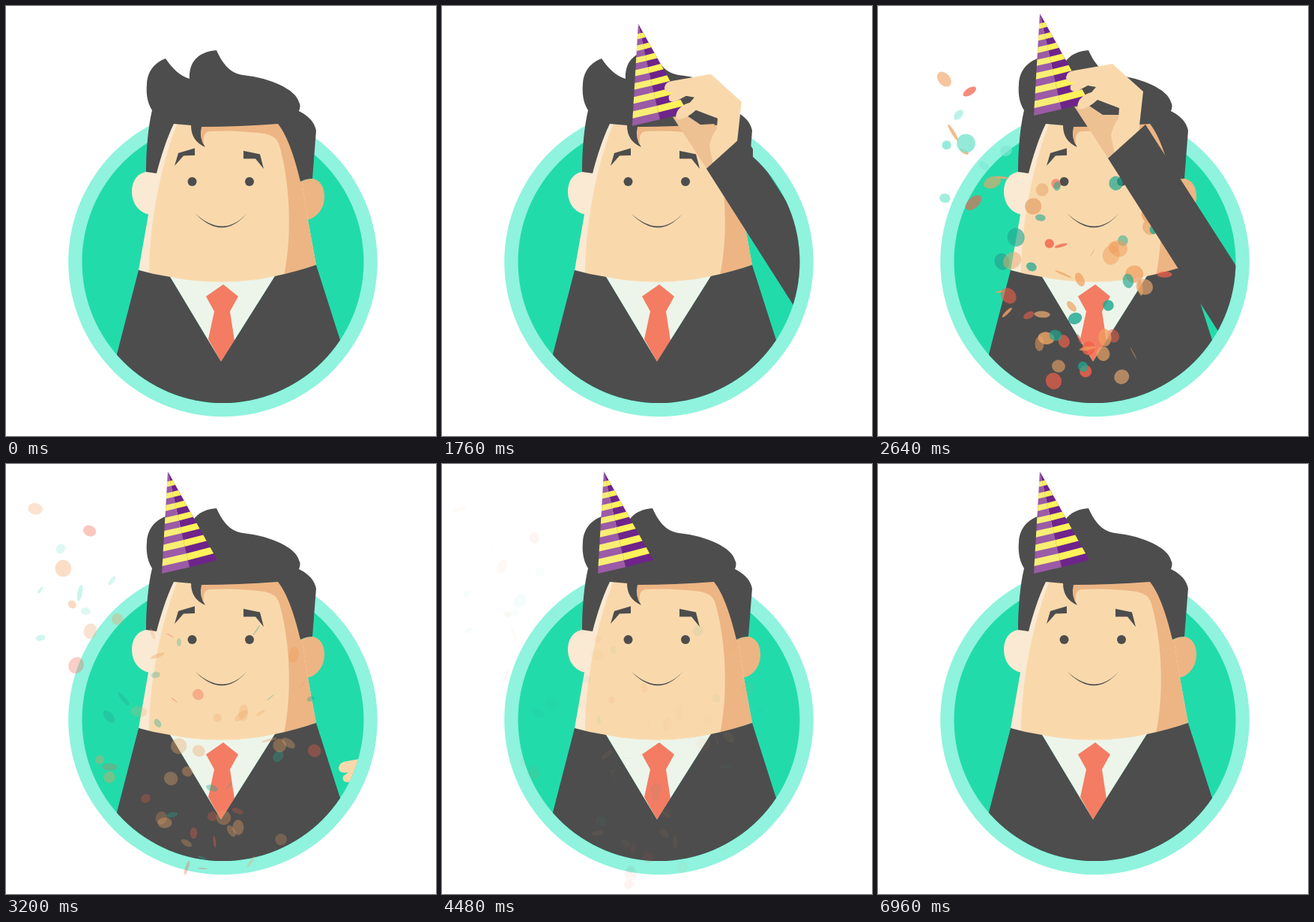
An HTML page with a canvas for the animation above (7.04 s loop, 574 by 573 pixels).

```html
<!DOCTYPE html>
<html lang="en">
<head>
<meta charset="utf-8">
<title>Party hat</title>
<style>
  html, body { margin: 0; width: 100%; height: 100%; overflow: hidden; background: #fff; }
  canvas { display: block; width: 574px; height: 573px; }
</style>
</head>
<body>
<canvas id="stage" width="574" height="573"></canvas>
<script>
const ctx = document.getElementById('stage').getContext('2d');
const LOOP = 7040, STEP = 80;
const ENTER = 800, SETTLE = 2160, POP = 2200, RELEASE = 2640, GONE = 5800;
const CX = 289.5, CY = 341, R = 188;
const DARK = '#4d4d4d', SKIN = '#f9d9ac', SHADE = '#edb583', PALE = '#fae9d3';

const shapes = {
  leftEar: 'M203 223C181 215 168 229 168 247C168 264 178 275 191 278Z',
  rightEar: 'M391 236Q399 230 409 230C420 232 425 242 425 254C425 270 415 282 402 285Z',
  head: 'M177 352L190 278L199 222L210 150H390L395 234L403 285L414 345Q290 389 177 352Z',
  face: 'M191 357C191 295 205 215 229 156H363L385 230L385 355Q290 379 191 357Z',
  shade: 'M260 158L363 150H390L395 234L403 285L414 345Q394 352 371 359C382 310 380 235 364 183Q360 173 345 170Q305 165 272 167Q262 168 264 184Q255 172 260 158Z',
  hair: 'M201 223L187 221C187 190 190 160 195 139C188 128 187 115 188 104C189 85 200 75 213 70C222 83 232 93 245 97C244 75 256 61 281 59C287 72 296 89 316 92C355 96 387 112 391 128Q394 133 391 140Q411 150 414 166L409 230Q400 230 393 234C386 205 377 175 363 157Q310 161 261 161Q257 176 266 188Q247 180 247 159L224 157C215 175 207 200 201 223Z',
  brows: 'M225 213L230 196L252 189.5V199L237 199.5ZM317 193L339 197.5L344 217L333 203.5H317Z',
  smile: 'M252 276Q289 314.5 322 276Q290 311 252 276Z',
  suit: 'M177 352Q198 358 219 361L287 474L359 360Q388 354 414 345L446 445L480 550H120L148 464Z',
  shirt: 'M219 361Q290 376 359 360L287 474Z',
  tie: 'M290 371L310 387L299 407L305 446L287 474L270 444L278 407L267 387Z',
  thumb: 'M262 134L282 133L300 145L322 145L330 180L308 204Z',
  hand: 'M251 95Q252 87 262 86L313 77L354 114L348 168L316 197L311 172Q314 159 321 150L322 136L293 125Q282 135 273 137Q262 139 269 125Q275 117 285 115L291 108L280 106L265 114Q255 115 257 106L264 101Q251 103 251 95Z',
  sleeve: 'M307 203L357 158L657 625L607 673Z'
};
for (const k in shapes) shapes[k] = new Path2D(shapes[k]);

const frame = new Path2D();
frame.arc(CX, CY, R, 0, 7);
// the arm may also show above the ring, in front of the hair
const reach = new Path2D(frame);
reach.rect(150, 0, 265, 230);

const clamp = x => Math.max(0, Math.min(1, x));
const mix = (a, b, k) => a + (b - a) * k;

// offset from the resting place: straight climb, small overshoot, landing
function hatOffset(t) {
  const u = Math.max(0, (SETTLE - t) / 1040);
  const hover = -9 * Math.sin(Math.PI * Math.min(1, u / 0.36));
  return [159 * u ** 1.3, Math.max(244 * (1.55 * u - 0.54), hover)];
}

function armOffset(t) {
  if (t < RELEASE) return hatOffset(t);
  const k = ((t - RELEASE) / 560) ** 1.6;
  return [193 * k, 310 * k];
}

function fill(color, shape) {
  ctx.fillStyle = color;
  ctx.fill(shape);
}

function disc(color, x, y, r) {
  ctx.fillStyle = color;
  ctx.beginPath();
  ctx.arc(x, y, r, 0, 7);
  ctx.fill();
}

function poly(color, ...pts) {
  ctx.fillStyle = color;
  ctx.beginPath();
  pts.forEach(p => ctx.lineTo(p[0], p[1]));
  ctx.fill();
}

function drawMan() {
  disc('#8ff3de', CX, CY, 206.3);
  disc('#22dbab', CX, CY, R);
  fill(PALE, shapes.leftEar);
  fill(SHADE, shapes.rightEar);
  fill(PALE, shapes.head);
  fill(SKIN, shapes.face);
  fill(SHADE, shapes.shade);
  fill(DARK, shapes.hair);
  fill(DARK, shapes.brows);
  disc(DARK, 248.5, 234, 6);
  disc(DARK, 325, 234, 6);
  fill(DARK, shapes.smile);
  fill('#edf5ea', shapes.shirt);
  fill('#f47c63', shapes.tie);
  ctx.save();
  ctx.clip(frame);
  fill(DARK, shapes.suit);
  ctx.restore();
}

function drawHat() {
  const edge = (dx, dy) => t => [216 + dx * t, 10 + dy * t];
  const left = edge(-8, 136), mid = edge(29, 127.5), right = edge(66, 118);
  const band = (a, b, c1, c2) => {
    poly(c2, mid(a), right(a), right(b), mid(b));
    poly(c1, left(a), mid(a), mid(b), left(b));
  };
  band(0, 1, '#9b5ba6', '#6e248a');
  // stripes widen a little towards the brim
  for (let i = 0; i < 7; i++) {
    const t = 0.125 + 0.111 * i + 0.0028 * i * i, w = 0.026 + 0.0015 * i;
    band(t - w, t + w, '#f8ee74', '#fdf25a');
  }
}

const colors = ['#eda566', '#f0a060', '#f2604a', '#1fa893', '#f0a060', '#f2604a', '#e8a870', '#22a890'];
const rnd = n => {
  const v = Math.sin(n * 127.1 + 11.7) * 43758.5453;
  return v - Math.floor(v);
};

// most pieces burst over the chest, every fifth one flies to the upper left
const pieces = Array.from({ length: 64 }, (_, i) => {
  const r = k => rnd(i + k * 100);
  const plume = i % 5 === 0;
  const turn = r(1) * 2 * Math.PI, far = Math.sqrt(r(2)) * (plume ? 90 : 150);
  return {
    x: (plume ? 110 : 275) + Math.cos(turn) * far * 0.8,
    y: (plume ? 175 : 360) + Math.sin(turn) * far,
    color: plume && i % 2 ? '#7fe6d2' : colors[i % colors.length],
    size: mix(6, 13, r(3)),
    tilt: r(4) * Math.PI,
    flip: r(5) * Math.PI,
    alpha: mix(0.5, 0.85, r(6)),
    dx: mix(-40, 40, r(7)),
    dy: mix(-25, 45, r(8))
  };
});

function drawConfetti(t) {
  if (t <= POP || t > GONE) return;
  const s = (t - RELEASE) / 1000;
  const open = x => 1 - Math.exp((POP - x) / 260);
  const spread = open(t) / open(RELEASE);
  const drift = 1 - Math.exp(-s * 1.2);
  const fade = clamp((t - POP) / 200) * Math.min(1, Math.exp(-s * 1.3)) * clamp((GONE - t) / 900);
  for (const p of pieces) {
    const r = p.size * (1 - 0.25 * drift);
    const flat = Math.abs(Math.cos(p.flip + drift * 3));
    ctx.fillStyle = p.color;
    ctx.globalAlpha = fade * p.alpha;
    ctx.beginPath();
    ctx.ellipse(mix(270, p.x, spread) + p.dx * drift, mix(330, p.y, spread) + p.dy * drift,
      r, Math.max(0.7, r * flat), p.tilt + drift * p.dx / 20, 0, 7);
    ctx.fill();
  }
  ctx.globalAlpha = 1;
}

function placed([x, y], paint) {
  ctx.save();
  ctx.clip(reach);
  ctx.translate(x, y);
  paint();
  ctx.restore();
}

function draw(t) {
  ctx.fillStyle = '#fff';
  ctx.fillRect(0, 0, 574, 573);
  drawMan();
  if (t < ENTER) return;
  const arm = armOffset(t);
  placed(arm, () => fill('#eec193', shapes.thumb));
  placed(hatOffset(t), drawHat);
  drawConfetti(t);
  placed(arm, () => {
    fill(SKIN, shapes.hand);
    fill(DARK, shapes.sleeve);
  });
}

const start = performance.now();
function tick() {
  const t = (performance.now() - start) % LOOP;
  draw(Math.floor(t / STEP) * STEP);
  requestAnimationFrame(tick);
}
tick();
</script>
</body>
</html>
```
